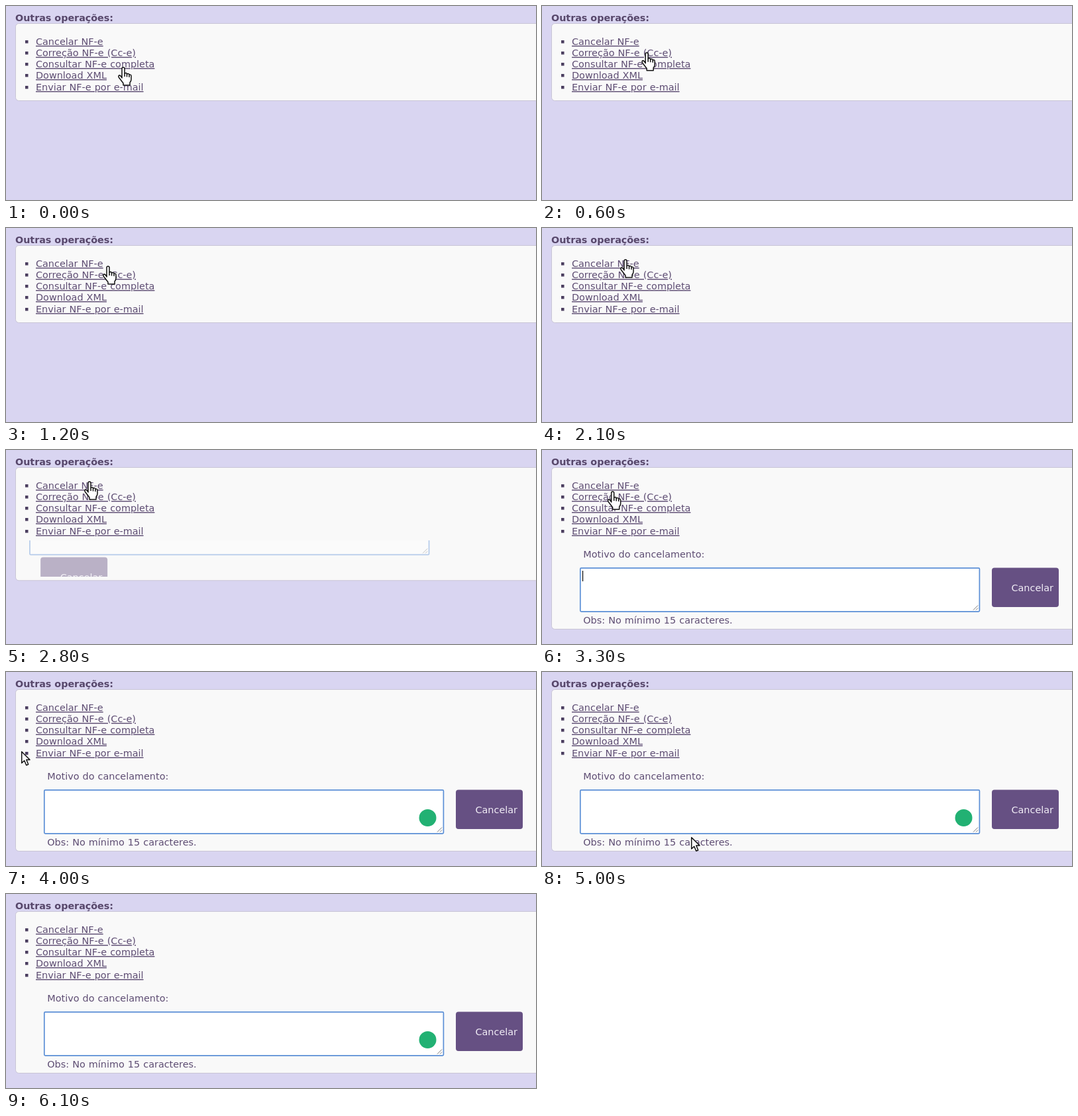
Recreate the animation shown at these times as an HTML page. Size 800 by 294 pixels, loop 6.2 s.

```html
<!DOCTYPE html>
<html lang="pt-BR">
<head>
<meta charset="utf-8">
<title>Outras operações</title>
<style>
html, body { margin: 0; width: 100%; height: 100%; overflow: hidden; background: #d9d5f1; }
svg { display: block; width: 800px; height: 294px; }
text { font: 14.4px "DejaVu Sans", sans-serif; word-spacing: .5px; fill: #5e4d73; }
.title { font-weight: bold; font-size: 14.3px; word-spacing: 0; fill: #57476b; }
.link { text-decoration: underline; }
.cursor path { fill: #fff; stroke: #111; stroke-width: 1.5; stroke-linejoin: round; }
.cursor .line { fill: none; }
</style>
</head>
<body>
<svg viewBox="0 0 800 294">
  <defs><clipPath id="clip"><rect id="clipBox" y="137" width="800"/></clipPath></defs>
  <text class="title" x="14" y="23">Outras operações:</text>
  <rect id="panel" x="14.5" y="26.5" width="800" rx="5" fill="#f9f9f9" stroke="#c9c5d6"/>
  <g id="links"></g>
  <g clip-path="url(#clip)">
    <g id="form">
      <g id="field">
        <text x="62.3" y="163">Motivo do cancelamento:</text>
        <rect x="57.8" y="178.8" width="602.6" height="66" rx="1.5" fill="#fff" stroke="#5b8fd6" stroke-width="1.7"/>
        <path d="M651 242.5l7-7M655 242.5l3-3" stroke="#777"/>
        <path id="caret" d="M61.5 183v16" stroke="#222" stroke-width="1.4"/>
        <circle id="badge" cx="636.5" cy="221" r="13" fill="#22b173"/>
        <text id="note" x="62.3" y="263">Obs: No mínimo 15 caracteres.</text>
      </g>
      <g id="button">
        <rect x="679" y="178.5" width="101" height="59.5" rx="4" fill="#665083"/>
        <text x="708.5" y="214" style="fill:#f1edf6">Cancelar</text>
      </g>
    </g>
  </g>
  <g id="hand" class="cursor">
    <path d="M6 17V3Q6 1 8 1Q10 1 10 3V10Q13 8.5 13.5 11Q16.5 9.8 17 12Q20 11.5 20 14V19Q20 22 18 24V28H8V25Q5 21 1.5 16.5Q0 14 2 13Q4 12.8 6 17Z"/>
    <path class="line" d="M10 10v5M13.5 11v4.500M17 12v4"/>
  </g>
  <g id="arrow" class="cursor"><path d="M.7 .7V18L4.700 14.300 7.700 21.300 10.700 20 7.800 13H13Z"/></g>
  <g id="beam" class="cursor"><path class="line" d="M0 0h6M3 0v16M0 16h6"/></g>
</svg>
<script>
const LOOP = 6200, STEP = 100;
const OPEN_AT = 2538, OPEN_TIME = 580;
const CARET_AT = 2950, BLINK = 530;
const $ = id => document.getElementById(id);

$('links').innerHTML = ['Cancelar NF-e', 'Correção NF-e (Cc-e)', 'Consultar NF-e completa',
  'Download XML', 'Enviar NF-e por e-mail'].map((label, i) => {
  const y = Math.floor(59 + 17.25 * i);
  return `<rect x="29" y="${y - 7}" width="4.5" height="4.5" fill="#4c3f60"/>
    <text class="link" x="45" y="${y}">${label}</text>`;
}).join('');

// time, x, y, shape used from that time on
const path = [
  [0, 169, 92, 'hand'], [700, 147, 66, 'hand'], [1200, 146, 57, 'hand'],
  [1500, 143, 56, 'hand'], [2100, 118, 47, 'hand'], [3200, 118, 47, 'hand'],
  [3500, 60, 92, 'arrow'], [3800, 24, 118, 'arrow'], [4000, 23, 120, 'arrow'],
  [4200, 40, 160, 'arrow'], [4400, 75, 200, 'beam'], [4900, 190, 228, 'beam'],
  [5000, 225, 250, 'arrow'], [5100, 250, 261, 'arrow'], [5600, 392, 294, '']
];

const show = (id, on) => $(id).setAttribute('visibility', on ? 'visible' : 'hidden');
const move = (id, x, y) => $(id).setAttribute('transform', `translate(${x} ${y})`);

function drawCursor(t) {
  const i = path.findLastIndex(p => p[0] <= t);
  const [t0, x0, y0, shape] = path[i];
  const [t1, x1, y1] = path[i + 1] || [LOOP, x0, y0];
  const k = (t - t0) / (t1 - t0);
  for (const id of ['hand', 'arrow', 'beam']) {
    show(id, id === shape);
    move(id, x0 + (x1 - x0) * k, y0 + (y1 - y0) * k);
  }
}

function drawForm(t) {
  const p = Math.min(1, Math.max(0, (t - OPEN_AT) / OPEN_TIME));
  const s = .5 - Math.cos(Math.PI * p) / 2;
  const grown = 128 * s;
  $('panel').setAttribute('height', 117 + grown);
  $('clipBox').setAttribute('height', grown);
  $('form').setAttribute('opacity', s);

  // While the form is narrow, the button wraps below the field.
  const wrapped = s < .8;
  const dx = -38 * (1 - s);
  const dy = wrapped ? 21 * s - 95 : grown - 128;
  move('field', dx, dy);
  move('button', wrapped ? dx - 605 : dx, wrapped ? dy + 70 : dy);
  show('note', !wrapped);
  show('badge', t >= 3400);
  show('caret', t >= CARET_AT && (t - CARET_AT) % (2 * BLINK) < BLINK);
}

function frame(now) {
  const t = Math.floor(now % LOOP / STEP) * STEP;
  drawForm(t);
  drawCursor(t);
  requestAnimationFrame(frame);
}
requestAnimationFrame(frame);
</script>
</body>
</html>
```
